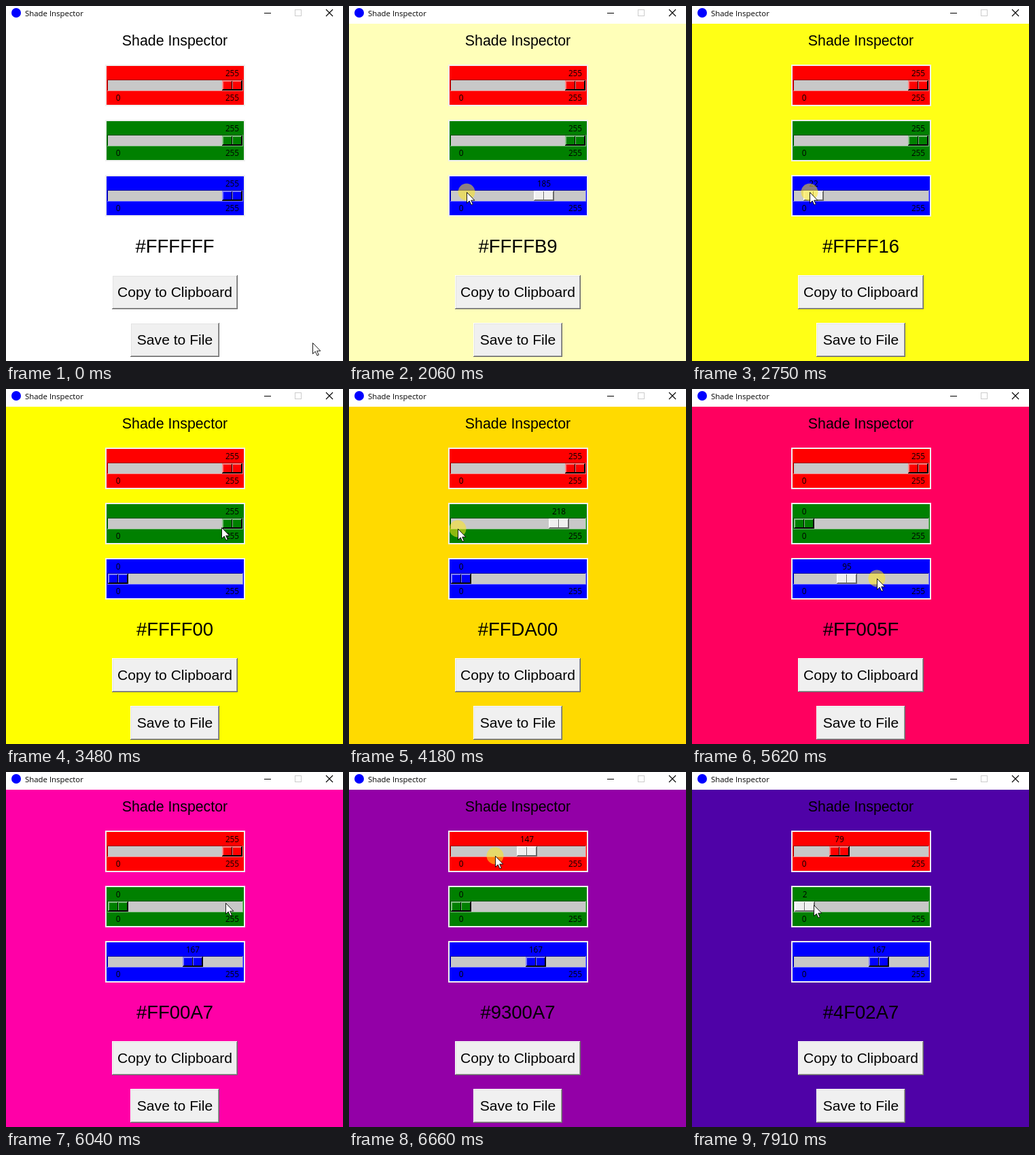
Write an HTML page that moves like this. It is 496 px wide and 521 px high and loops after 8000 ms.

```html
<!DOCTYPE html>
<html lang="en">
<head>
<meta charset="utf-8">
<style>
  html, body { margin: 0; width: 100%; height: 100%; overflow: hidden; background: #fff; }
  svg { display: block; }
  .ui { font-family: "Open Sans", "Noto Sans", sans-serif; }
  .body { font-family: "Liberation Sans", Arial, sans-serif; }
</style>
</head>
<body>
<svg id="stage" width="496" height="521" viewBox="0 0 496 521"></svg>
<script>
const LOOP = 8000, START = 270, TICK = 69.45;
const NAME = 'Shade Inspector';
const stage = document.getElementById('stage');

const sliders = ['#ff0000', '#008000', '#0000ff'].map((color, i) => ({ color, y: 86 + 81 * i }));
const [RED, GREEN, BLUE] = [0, 1, 2];

// The pointer rests at points and drags thumbs; grab is its offset from the thumb's left edge
const moves = [
  { from: 0, to: 210, x: 451, y: 494 },
  { from: 1570, to: 3037, slider: BLUE, value: 0, grab: 23, y: 273 },
  { from: 3460, to: 3650, x: 317, y: 203 },
  { from: 3830, to: 5202, slider: GREEN, value: 0, grab: 10, y: 205 },
  { from: 5340, to: 5850, slider: BLUE, value: 167, grab: 12, y: 278 },
  { from: 6030, to: 6040, x: 323, y: 192 },
  { from: 6455, to: 6810, slider: RED, value: 79, grab: 13, y: 123 },
  { from: 7700, to: 7840, slider: GREEN, value: 2, grab: 28, y: 195 }
];

const thumbX = value => 150 + value * 168 / 255;
const mix = (a, b, u) => a + (b - a) * u;
const progress = (t, a, b) => {
  const u = Math.min(1, Math.max(0, (t - a) / (b - a)));
  return u * u * (3 - 2 * u);
};

// Start and end of every move follow from the values reached before it
const values = [255, 255, 255];
for (const m of moves) {
  if (m.slider === undefined) { m.x0 = m.x1 = m.x; continue; }
  m.before = values[m.slider];
  m.x0 = thumbX(m.before) + m.grab;
  m.x1 = thumbX(m.value) + m.grab;
  values[m.slider] = m.value;
}

function pose(t) {
  const rgb = [255, 255, 255];
  let x, y, held = -1, last;
  for (const m of moves) {
    if (t < m.from) {
      const u = progress(t, last.to, Math.min(m.from, last.to + 800));
      x = mix(last.x1, m.x0, u);
      y = mix(last.y, m.y, u);
      break;
    }
    const u = progress(t, m.from, m.to);
    x = mix(m.x0, m.x1, u);
    y = m.y;
    if (m.slider !== undefined) {
      rgb[m.slider] = Math.round(mix(m.before, m.value, u));
      if (t < m.to) held = m.slider;
    }
    last = m;
  }
  return { x: Math.round(x), y: Math.round(y), rgb, held };
}

const rect = (x, y, w, h, fill) =>
  `<rect x="${x}" y="${y}" width="${w}" height="${h}" fill="${fill}"/>`;

const text = (s, x, y, size, font = 'body', anchor = 'middle') =>
  `<text class="${font}" x="${x}" y="${y}" font-size="${size}" text-anchor="${anchor}">${s}</text>`;

// One-pixel relief: lit top and left, shaded bottom and right
const bevel = (x, y, w, h, lit, shade, fill) =>
  rect(x, y, w, h, shade) + rect(x, y, w - 1, h - 1, lit) +
  rect(x + 1, y + 1, w - 2, h - 2, fill);

const button = (label, x, y, w) =>
  bevel(x, y, w, 50, '#fff', '#696969', '#f0f0f0') +
  bevel(x + 1, y + 1, w - 2, 48, '#e3e3e3', '#a0a0a0', '#f0f0f0') +
  text(label, x + w / 2, y + 32, 21.1);

function slider({ y, color }, value, px, py, held) {
  const x = Math.round(thumbX(value)), top = y + 23;
  const lit = `color-mix(in srgb, ${color}, #fff)`;
  const dark = `color-mix(in srgb, ${color} 60%, #000)`;
  const active = held || (px >= x && px < x + 30 && py >= top && py < top + 15);
  const tones = active ? ['#fff', '#696969', '#f0f0f0'] : [lit, '#000', color];
  return rect(146, y, 206, 61, '#f0f0f0') + rect(148, y + 2, 202, 57, color) +
    bevel(149, y + 22, 200, 17, dark, lit, '#c8c8c8') +
    bevel(x, top, 30, 15, ...tones) +
    bevel(x + 1, top + 1, 14, 13, ...tones) + bevel(x + 15, top + 1, 14, 13, ...tones) +
    text(value, x + 15, y + 17, 11.8, 'ui') +
    text(0, 165, y + 53, 11.8, 'ui') + text(255, 333, y + 53, 11.8, 'ui');
}

const titleBar = rect(0, 0, 496, 26, '#fff') +
  '<circle cx="15" cy="10" r="7" fill="#00f"/>' + text(NAME, 28, 15, 11.4, 'ui', 'start') +
  rect(380, 10, 10, 1, '#000') +
  '<rect x="425.5" y="5.5" width="9" height="9" fill="none" stroke="#ccc"/>' +
  '<path d="M471 5l10 10m0-10l-10 10" stroke="#000" stroke-width="1.1"/>';

const pointer = (x, y, down) => `<g transform="translate(${x} ${y})">` +
  (down ? '<circle r="12.5" fill="#ffe81e" fill-opacity=".55"/>' : '') +
  '<path d="M.5 .5V16.5L4.2 13L7 19L9.3 18L6.7 12.2H11.8Z" fill="#fff" stroke="#000" stroke-width=".9"/></g>';

function draw(t) {
  const { x, y, rgb, held } = pose(t);
  const hex = '#' + rgb.map(v => v.toString(16).padStart(2, '0')).join('').toUpperCase();
  stage.innerHTML = rect(0, 0, 496, 521, hex) + titleBar +
    text(NAME, 248.5, 58, 21.33) +
    sliders.map((s, i) => slider(s, rgb[i], x, y, held === i)).join('') +
    text(hex, 248.5, 362, 27.5) +
    button('Copy to Clipboard', 156, 395, 185) +
    button('Save to File', 183, 465, 131) +
    pointer(x, y, held >= 0);
}

// The picture advances in even ticks, shown slightly early
let shown;
function frame() {
  const now = performance.now() % LOOP;
  const tick = Math.max(-1, Math.floor((now - START + 20) / TICK));
  if (tick !== shown) {
    shown = tick;
    draw(Math.max(0, START + tick * TICK));
  }
  requestAnimationFrame(frame);
}
frame();
</script>
</body>
</html>
```
